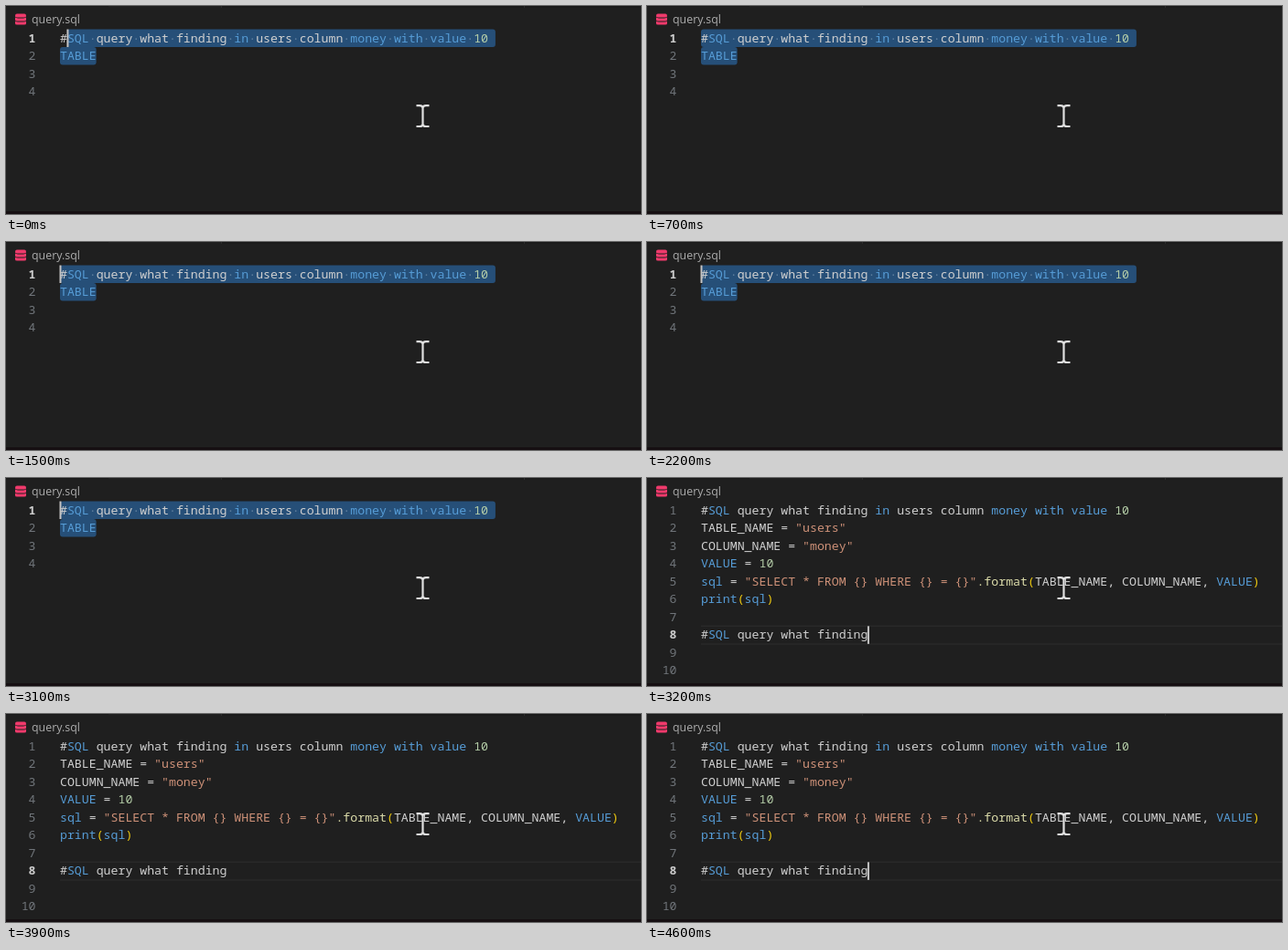
Animation of 694 by 228 pixels, one loop 4700 ms. Source, as an HTML page:

```html
<!DOCTYPE html>
<html lang="en">
<head>
<meta charset="utf-8">
<title>query.sql</title>
<style>
  html, body { margin: 0; width: 100%; height: 100%; overflow: hidden; background: #1f1f1f; }
  svg { display: block; width: 694px; height: 228px; }
  .code text { font: 500 13.22px "Noto Sans Mono", monospace; white-space: pre; fill: #d0d0d0; }
  .code .number { fill: #70757a; text-anchor: end; }
  .code .active { fill: #cccccc; font-weight: 700; }
  .code .dots { fill: #5f7f9f; }
  .word { fill: #569cd6; }
  .string { fill: #ce9178; }
  .digit { fill: #b5cea8; }
  .bracket { fill: #f0cb10; }
  .method { fill: #dcdcaa; }
  .title { font: 12.4px "Open Sans", sans-serif; fill: #adadad; }
</style>
</head>
<body>
<svg viewBox="0 0 694 228">
  <rect width="694" height="228" fill="#1f1f1f"/>
  <rect width="112" height="1" fill="#181818"/>
  <rect x="236" width="458" height="1.5" fill="#181818"/>
  <path d="M235.5 0V2M566.5 0V2" stroke="#2b2b2b"/>
  <rect y="225" width="694" height="3" fill="#160f12"/>

  <g fill="#f03a6c">
    <path d="M10 10.5Q10 8.6 12 8.6H20Q22 8.6 22 10.5V11.6Q22 12.4 20 12.4H12Q10 12.4 10 11.6Z"/>
    <path id="band" d="M10 12.6Q11 13.4 13 13.4H19Q21 13.4 22 12.6V15.2Q22 16.5 20 16.5H12Q10 16.5 10 15.2Z"/>
    <use href="#band" y="4.1"/>
  </g>
  <text class="title" x="28" y="19.3">query.sql</text>

  <g id="before" class="code"></g>
  <g id="after" class="code"></g>
  <rect id="caret" width="2" height="19.5" fill="#c4c4c4"/>
  <path d="M448.5 109.2H452Q455.5 109.2 455.5 112Q455.5 109.2 459 109.2H462.5
           M455.5 111V130M448.5 132H452Q455.5 132 455.5 129.2Q455.5 132 459 132H462.5"
        fill="none" stroke="#e0e0e0" stroke-width="2.2"/>
</svg>
<script>
const LEFT = 59, CHAR = 7.932, TOP = 25.5, LINE = 19.55;
const LOOP = 4700, SELECTED = 100, GENERATED = 3200;
const BLINKS = [500, 1000, 1600, 2000, 2600, 3000, GENERATED + 500, GENERATED + 1000];

const comment = '#SQL query what finding in users column money with value 10';
const beforeLines = [comment, 'TABLE', '', ''];
const afterLines = [
  comment,
  'TABLE_NAME = "users"',
  'COLUMN_NAME = "money"',
  'VALUE = 10',
  'sql = "SELECT * FROM {} WHERE {} = {}".format(TABLE_NAME, COLUMN_NAME, VALUE)',
  'print(sql)',
  '',
  '#SQL query what finding',
  '', ''
];

const $ = id => document.getElementById(id);
const lineTop = row => TOP + row * LINE;
const column = n => LEFT + n * CHAR;

const TOKENS = /(?<string>"[^"]*")|(?<digit>\d+)|(?<bracket>[()])|(?<method>\.format)|(?<word>\b(?:SQL|TABLE|VALUE|in|money|with|value|sql|print)\b)/g;

function highlight(line) {
  return line.replace(TOKENS, (token, ...rest) => {
    const groups = rest.at(-1);
    const kind = Object.keys(groups).find(name => groups[name]);
    return `<tspan class="${kind}">${token}</tspan>`;
  });
}

function textAt(row, x, content, kind = '') {
  return `<text x="${x}" y="${lineTop(row) + 14}" class="${kind}">${content}</text>`;
}

function editor(lines, activeRow) {
  return lines.map((line, row) =>
    textAt(row, 32.5, row + 1, row === activeRow ? 'number active' : 'number') +
    textAt(row, LEFT, highlight(line))
  ).join('');
}

function selection(id, row, length) {
  return `<rect id="${id}" x="${LEFT}" y="${lineTop(row)}" width="${length * CHAR}"
    height="${LINE}" rx="3" fill="#264f78"/>`;
}

const dots = comment.replace(/./g, c => c === ' ' ? '·' : '\u00a0');
$('before').innerHTML =
  selection('firstLine', 0, comment.length + 1) + selection('secondLine', 1, 5) +
  textAt(0, LEFT, dots, 'dots') + editor(beforeLines, 0);

$('after').innerHTML =
  `<path d="M${LEFT} ${lineTop(7)}H694M${LEFT} ${lineTop(8)}H694" stroke="#292929" stroke-width="1.5"/>` +
  editor(afterLines, 7);

function draw(now) {
  const t = now % LOOP;
  const generated = t >= GENERATED;
  const skipped = t < SELECTED ? 1 : 0;

  $('before').style.display = generated ? 'none' : '';
  $('after').style.display = generated ? '' : 'none';
  $('firstLine').setAttribute('x', column(skipped));
  $('firstLine').setAttribute('width', (comment.length + 1 - skipped) * CHAR);

  const blinked = BLINKS.filter(time => time <= t).length;
  $('caret').style.display = blinked % 2 ? 'none' : '';
  $('caret').setAttribute('x', column(generated ? 23 : skipped) - 0.5);
  $('caret').setAttribute('y', lineTop(generated ? 7 : 0));
  requestAnimationFrame(draw);
}
requestAnimationFrame(draw);
</script>
</body>
</html>
```
